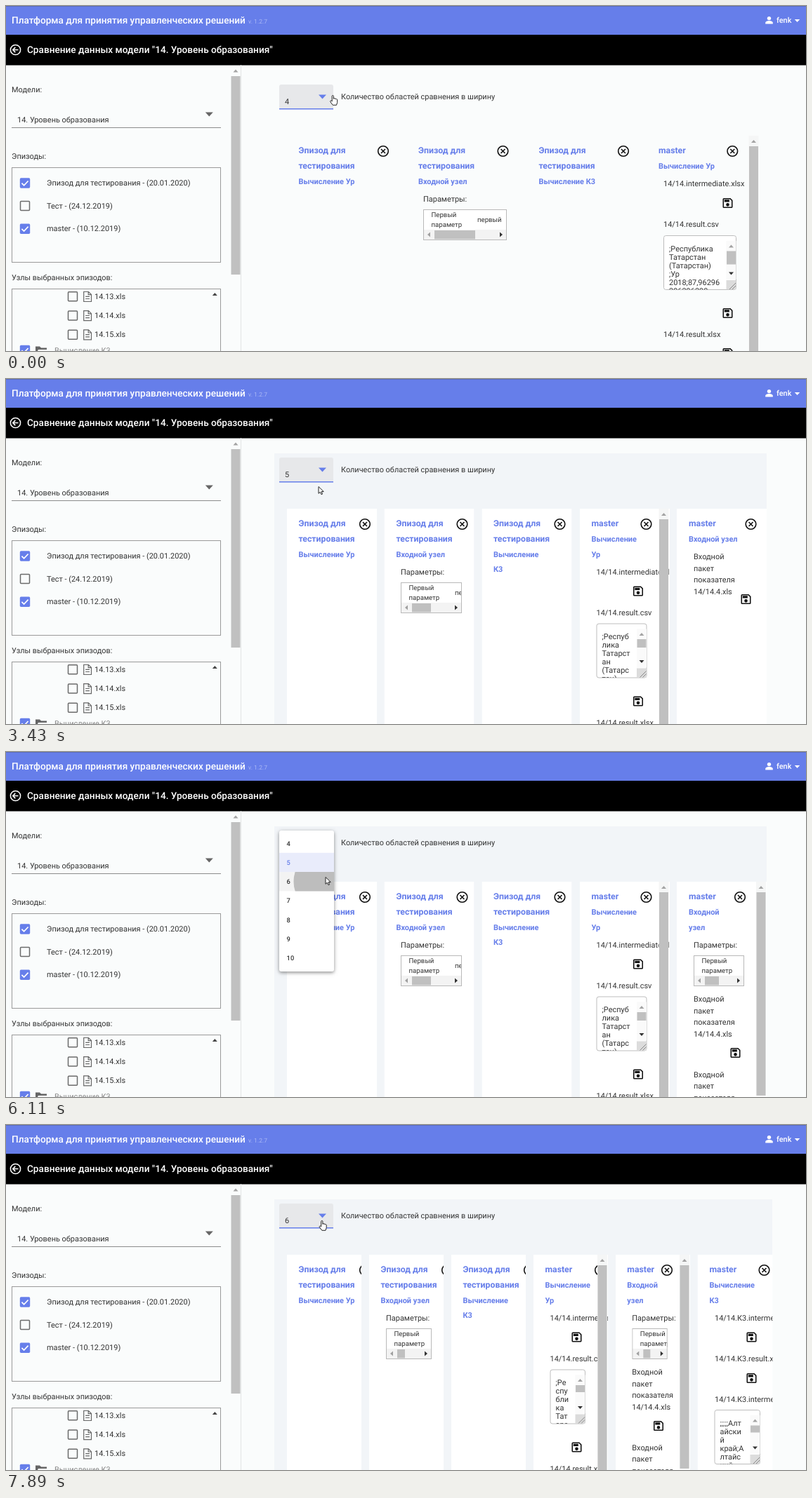
An HTML page for the animation above (8000 ms loop, 1139 px wide and 492 px high).

```html
<!DOCTYPE html>
<html lang="ru">
<head>
<meta charset="utf-8">
<title>Сравнение данных</title>
<style>
html, body { margin: 0; width: 100%; height: 100%; overflow: hidden; background: #fafcfc; }
#stage { display: block; width: 1139px; height: 492px; }
text { font: 10.94px Roboto, sans-serif; fill: #333; white-space: pre; text-rendering: geometricPrecision; }
.bar { font-size: 13.6px; font-weight: 500; fill: #fff; }
.ver { font-size: 8.6px; fill: #aab7f5; }
.user { font-weight: 500; fill: #fff; }
.big { font-size: 12.25px; font-weight: 700; fill: #667eea; }
.sub { font-weight: 700; fill: #667eea; }
.cell { font-size: 9.65px; }
.item { font-size: 9.3px; font-weight: 500; }
.dim { fill: #888; }
</style>
</head>
<body>
<svg id="stage" viewBox="0 0 1139 492"></svg>
<script>
const BLUE = '#667eea', PAGE = '#f2f5f8', THUMB = '#c0c0c0';

const text = (x, y, s, cls = '') => `<text x="${x}" y="${y}" class="${cls}">${s}</text>`;
const rect = (x, y, w, h, fill, extra = '') =>
  `<rect x="${x}" y="${y}" width="${w}" height="${h}" fill="${fill}" ${extra}/>`;
const frame = (x, y, w, h, color, r = 0, fill = 'none') =>
  rect(x + .5, y + .5, w - 1, h - 1, fill, `stroke="${color}" rx="${r}"`);
const path = (d, extra) => `<path d="${d}" ${extra}/>`;
const line = (d, color, w = 1) => path(d, `fill="none" stroke="${color}" stroke-width="${w}"`);
const clip = (x, y, w, h, body) =>
  `<svg x="${x}" y="${y}" width="${w}" height="${h}" viewBox="${x} ${y} ${w} ${h}">${body}</svg>`;
const group = (id, body) => `<g id="${id}">${body}</g>`;

// Triangle pointing down, turned by an angle around its centre
const tri = (x, y, w, h, fill, turn = 0) =>
  path(`M${-w / 2} ${-h / 2}H${w / 2}L0 ${h / 2}Z`, `fill="${fill}" transform="translate(${x} ${y}) rotate(${turn})"`);

const close = (x, y = 207) => `<g transform="translate(${x} ${y})" fill="none" stroke="#111" stroke-width="1.6">
  <circle r="7.3"/><path d="M-3-3L3 3M3-3L-3 3"/></g>`;

const save = (x, y) => path('M17 3H5a2 2 0 0 0-2 2v14a2 2 0 0 0 2 2h14a2 2 0 0 0 2-2V7zM19 19H5V5h11.2L19 7.8zM12 12a3 3 0 1 0 0 6 3 3 0 0 0 0-6zM6 6h9v4H6z',
  `fill="#111" fill-rule="evenodd" transform="translate(${x} ${y}) scale(.78) translate(-12 -12)"`);

const check = (x, y, on) => on
  ? rect(x - 7.2, y - 7.2, 14.4, 14.4, BLUE, 'rx="1.6"') + line(`M${x - 4.6} ${y + .2}l3.2 3.2 6-6.4`, '#fff', 1.7)
  : rect(x - 6.5, y - 6.5, 13, 13, 'none', 'rx="1" stroke="#6b6b6b" stroke-width="1.5"');

const fileIcon = (x, y) =>
  line(`M${x - 5.3} ${y - 6.8}h6.8l4 4v10h-10.8zM${x - 2.8} ${y}h5.8M${x - 2.8} ${y + 3.2}h5.8M${x + 1.2} ${y - 6.6}v3.9h4`, '#666', 1.2);

const scroll = (x, y = 185, end = 492) =>
  rect(x, y, 14, end - y, '#f5f6f6') + tri(x + 7, y + 8, 7, 4, '#a3a3a3', 180) + rect(x + .5, y + 15, 13, end - y - 15, THUMB);

const head = (x, big, small, closeX) =>
  [...big.split('|').map(s => [s, 'big']), ...small.split('|').map(s => [s, 'sub'])]
    .map(([s, cls], i) => text(x, 210.4 + 21.6 * i, s, cls)).join('') + close(closeX);

const params = (x, w, thumb) => text(x, 278.6, 'Параметры:') +
  clip(x, 290, w, 44, rect(x, 290, w, 44, '#fff') +
    text(x + 11.5, 301, 'Первый', 'cell') + text(x + 11.5, 314.8, 'параметр', 'cell') + text(x + 77, 307.5, 'первый', 'cell') +
    rect(x, 319, w, 14, '#f3f3f3') + rect(x + 16, 320, thumb, 12.4, THUMB) +
    tri(x + 8, 326, 7, 4, '#a0a0a0', 90) + tri(x + w - 8, 326, 7, 4, '#333', -90) +
    frame(x, 290, w, 44, '#b9b9b9'));

const area = (x, y, w, thumb, lines) => {
  const bar = x + w - 14.5, mid = bar + 7, cx = x + w - 1, cy = y + 77;
  return frame(x, y, w, 78, '#bdbdbd', 3, '#fff') + clip(x, y, w, 77.5,
    lines.split('|').map((s, i) => text(x + 8, y + 22.5 + 12 * i, s)).join('') +
    rect(bar, y + 8, 14, 55, '#fafafa') + rect(bar + .5, y + 22.5, 13, thumb, THUMB) +
    tri(mid, y + 15.5, 7, 4, '#a3a3a3', 180) + tri(mid, y + 54.5, 7, 4, '#333') +
    rect(bar, y + 64, 14, 13.5, '#dcdcdc') + line(`M${cx - 9} ${cy}l9-9M${cx - 5} ${cy}l5-5`, '#888'));
};

const results = (x, dy, saveX, w, thumb, lines) =>
  text(x, 257 + dy, '14/14.intermediate.xlsx') + save(saveX, 281 + dy) +
  text(x, 315 + dy, '14/14.result.csv') + area(x, 327 + dy, w, thumb, lines) +
  save(saveX, 438 + dy) + text(x, 472 + dy, '14/14.result.xlsx') + save(saveX, 495 + dy);

const packet = (x, y) => ['Входной', 'пакет', 'показателя', '14/14.4.xls']
  .map((s, i) => text(x, y + 16.5 * i, s)).join('');

const card = (x, w, body) => clip(x, 185, w, 307, rect(x, 185, w, 307, '#fff') + body);
const episode = 'Эпизод для|тестирования', calc = 'Вычисление', input = 'Входной узел';

function sidebar() {
  const rows = ['Эпизод для тестирования - (20.01.2020)', 'Тест - (24.12.2019)', 'master - (10.12.2019)'];
  return text(8, 123, 'Модели:') + text(16, 165.5, '14. Уровень образования') +
    tri(289.3, 154.5, 11, 6, '#666') + line('M8 173.5H306', '#8c8c8c') +
    text(8, 218, 'Эпизоды:') + frame(8, 230, 298, 136, '#9a9a9a') +
    rows.map((s, i) => check(27, 252.5 + 32.6 * i, i != 1) + text(58, 256 + 32.6 * i, s)).join('') +
    text(8, 391, 'Узлы выбранных эпизодов:') + frame(8, 403, 298, 120, '#9a9a9a') +
    tri(297.3, 411, 7, 4, '#444', 180) +
    [13, 14, 15].map((n, i) => check(95, 414.3 + 27.2 * i) + fileIcon(116, 414.3 + 27.2 * i) +
      text(126, 418 + 27.2 * i, `14.${n}.xls`)).join('') +
    check(27, 491, true) + path('M42 485.5h6l2 2h8v2.5H46l-3 6h-1z', 'fill="#666"') +
    text(69, 494.5, calc + ' К3', 'dim') +
    tri(327, 92.5, 7, 4, '#a3a3a3', 180) + rect(320.5, 100, 13, 283, THUMB) + rect(334, 84, 1, 408, '#e3e5e5');
}

function header() {
  return rect(0, 0, 1139, 41, BLUE) + rect(0, 0, 1139, 1, '#5b6cb8') + rect(0, 41, 1139, 43.5, '#000') +
    text(8, 25, 'Платформа для принятия управленческих решений', 'bar') + text(345, 24.6, 'v. 1.2.7', 'ver') +
    '<circle cx="1086.5" cy="17.6" r="2.7" fill="#fff"/>' +
    path('M1081.2 25.5v-1.4c0-4 10.6-4 10.6 0v1.4z', 'fill="#fff"') +
    text(1097, 24.2, 'fenk', 'user') + tri(1126.5, 21, 7.5, 4, '#fff') +
    '<circle cx="13.5" cy="62.5" r="7.1" fill="none" stroke="#fff" stroke-width="1.5"/>' +
    line('M17.5 62.5H10M13.3 58.9L9.8 62.5l3.5 3.6', '#fff', 1.6) +
    text(30, 67.2, 'Сравнение данных модели "14. Уровень образования"', 'bar');
}

const four = group('patch', rect(381.5, 106, 96, 219, PAGE) + rect(400, 185, 77.5, 140, '#fff')) +
  head(416.5, episode, calc + ' Ур', 537) +
  head(587, episode, input, 707.5) + params(594, 119, 58) +
  head(758.5, episode, calc + ' К3', 879) +
  head(929, 'master', calc + ' Ур', 1034.3) +
  results(936, 0, 1027.5, 104, 19, ';Республика|Татарстан|(Татарстан)|;Ур|2018;87,96296|296296298') +
  scroll(1057.5);

const five = rect(382, 106, 701, 386, PAGE) +
  card(400, 128, head(416.5, episode, calc + ' Ур', 511)) +
  card(538.5, 128, head(555.5, episode, input, 649.5) + params(562, 87, 27)) +
  card(677.5, 128, head(694, episode, calc + '|К3', 788.5)) +
  card(817, 128, head(833.5, 'master', calc + '|Ур', 911.5) +
    results(840.5, 21.5, 900, 72, 12, ';Респуб|лика|Татарст|ан|(Татарс|тан)') + scroll(929.5)) +
  card(955, 128,
    group('early', head(972, 'master', input, 1060.5)) +
    group('packet', packet(979, 257.3) + save(1053.5, 314)) +
    group('full', head(972, 'master', 'Входной|узел', 1045) + params(979, 72, 20) +
      packet(979, 356) + save(1038.5, 429) + packet(979, 463.5) + scroll(1068, 185, 490)));

const six = rect(382, 106, 709, 386, PAGE) +
  card(400, 106, head(416.5, episode, calc + ' Ур', 511)) +
  card(517, 106, head(533.5, episode, input, 628) + params(541, 65, 11)) +
  card(634, 106, head(650.5, episode, calc + '|К3', 745)) +
  card(751, 106, head(767.5, 'master', calc + '|Ур', 846) +
    results(774.5, 21.5, 812.5, 50.5, 10, ';Ре|спу|бли|ка|Тат|арс') + scroll(842)) +
  card(868, 106, head(884.3, 'master', 'Входной|узел', 941) + params(891.3, 50.5, 10) +
    packet(891.3, 356) + save(929, 429) + packet(891.3, 463.5) + scroll(959, 185, 490)) +
  card(984.5, 107, head(1001.5, 'master', calc + '|К3', 1079.5) +
    group('part1', text(1009, 278.5, '14/14.К3.intermediate.xlsx') + save(1061.5, 302.5)) +
    group('part2', text(1009, 336.5, '14/14.К3.result.xlsx') + save(1061.5, 361)) +
    group('part3', text(1009, 394.5, '14/14.К3.intermediate.csv') +
      area(1008.5, 406, 65.5, 10, ';;;;;Алт|айски|й|край;А|лтайс|кий')));

const ROW = 27.3, rowY = n => 116.5 + ROW * (n - 4), items = [4, 5, 6, 7, 8, 9, 10];
const menu = rect(389, 112, 78, 201, '#fff', 'rx="3" style="filter:drop-shadow(0 2px 2px #0004) drop-shadow(0 1px 3px #0003)"') +
  rect(389, 0, 78, ROW, '#f3f3f3', 'id="hover"') + rect(389, 0, 78, ROW, '#e9ecfb', 'id="picked"') +
  [5, 6].map(n => group('ripple' + n, clip(389, rowY(n), 78, ROW,
    `<circle cx="${n == 5 ? 445 : 455}" cy="${rowY(n) + ROW / 2}" r="45.5" fill="#bdbdbd"/>`))).join('') +
  items.map(n => text(399.6, rowY(n) + 17, n, 'item')).join('');

const select = path('M389 147v-32q0-3 3-3h71q3 0 3 3v32z', 'fill="#e7e8ea"') + rect(389, 146, 77, 1.5, BLUE) +
  '<text id="value" x="397" y="139.6"></text>' + group('arrow', tri(0, 0, 11, 6, BLUE)) +
  text(477, 132.6, 'Количество областей сравнения в ширину');

const outline = 'fill="#fff" stroke="#222" stroke-width="1" stroke-linejoin="round"';
const cursors =
  path('M3.2 9V1.6a1.1 1.1 0 0 1 2.2 0V5.4a1 1 0 0 1 2 .2 1 1 0 0 1 1.8.4 .9.9 0 0 1 1.5.7V10.5L9.5 14.3H4.3L.8 9.6a1 1 0 0 1 1.5-1.3Z', 'id="hand" ' + outline) +
  path('M.5 .5V10.3L2.9 8.2 4.5 11.7 6.1 11 4.6 7.6H7.8Z', 'id="pointer" ' + outline);

const stage = document.getElementById('stage');
stage.innerHTML = rect(0, 0, 1139, 492, '#fafcfc') + header() + sidebar() +
  group('four', four) + group('five', five) + group('six', six) + select + group('menu', menu) + cursors;

const $ = id => document.getElementById(id);
const show = (id, on) => $(id).style.display = on ? '' : 'none';
const labels = [...stage.querySelectorAll('.item')];

// time, kind, x, y
const track = [
  [0, 'hand', 461, 127], [500, 'hand', 454, 127.5], [660, 'hand', 451, 126.5], [810, 'hand', 448, 126],
  [960, 'hand', 446.5, 126], [1240, 'pointer', 448.5, 126], [2040, 'hand', 440, 142], [2190, 'hand', 440, 143],
  [2310, 'hand', 441, 147], [2430, 'hand', 441.5, 151], [2580, 'hand', 442, 153], [2730, 'pointer', 444.5, 153],
  [4045, 'pointer', 441, 148], [4167, 'hand', 440, 138], [4290, 'hand', 444, 135], [4440, 'hand', 445.5, 133.5],
  [5420, 'hand', 445.5, 144.5], [5570, 'hand', 446, 152], [5690, 'hand', 449, 165], [5810, 'hand', 450, 178],
  [6110, 'pointer', 454.5, 178], [6900, 'pointer', 454, 173], [7450, 'pointer', 452.5, 159],
  [7610, 'pointer', 451.5, 147], [7760, 'hand', 446, 139], [7890, 'hand', 445.5, 136]
];
const fades = [[0, 0], [1400, .6], [1520, 1], [2855, .7], [2980, 0], [4870, .6], [4990, 1], [6230, .7], [6390, 0]];
const turns = [[0, 0], [1400, 90], [2980, 25], [3130, 0], [4870, 90], [6390, 25], [6530, 0]];
const hovers = [[0, 4], [2190, 5], [4870, 4], [5570, 5], [5690, 6]];
const at = (steps, t) => steps.findLast(s => s[0] <= t);

function draw(t) {
  const value = t < 2855 ? 4 : t < 6230 ? 5 : 6;
  const opacity = at(fades, t)[1];
  show('four', value == 4);
  show('five', value == 5);
  show('six', value == 6);
  show('patch', t >= 1400);
  show('early', t < 3922);
  show('packet', t >= 3430 && t < 3922);
  show('full', t >= 3922);
  show('part1', t >= 6650);
  show('part2', t >= 6775);
  show('part3', t >= 6900);

  $('value').textContent = value;
  $('arrow').setAttribute('transform', `translate(450.5 129.6) rotate(${at(turns, t)[1]})`);
  show('menu', opacity > 0);
  $('menu').setAttribute('opacity', opacity);
  $('hover').setAttribute('y', rowY(at(hovers, t)[1]));
  $('picked').setAttribute('y', rowY(value));
  $('picked').setAttribute('fill', opacity == .7 ? '#d0d6f6' : '#e9ecfb');
  labels.forEach((el, i) => el.style.fill = items[i] == value ? BLUE : '#333');
  show('ripple5', t >= 2730 && t < 2855);
  show('ripple6', t >= 6110 && t < 6230);

  const [, kind, x, y] = at(track, t);
  show('hand', kind == 'hand');
  show('pointer', kind == 'pointer');
  $(kind).setAttribute('transform', `translate(${x} ${y})`);
}

const start = performance.now();
function tick() {
  draw((performance.now() - start) % 8000);
  requestAnimationFrame(tick);
}
tick();
</script>
</body>
</html>
```
